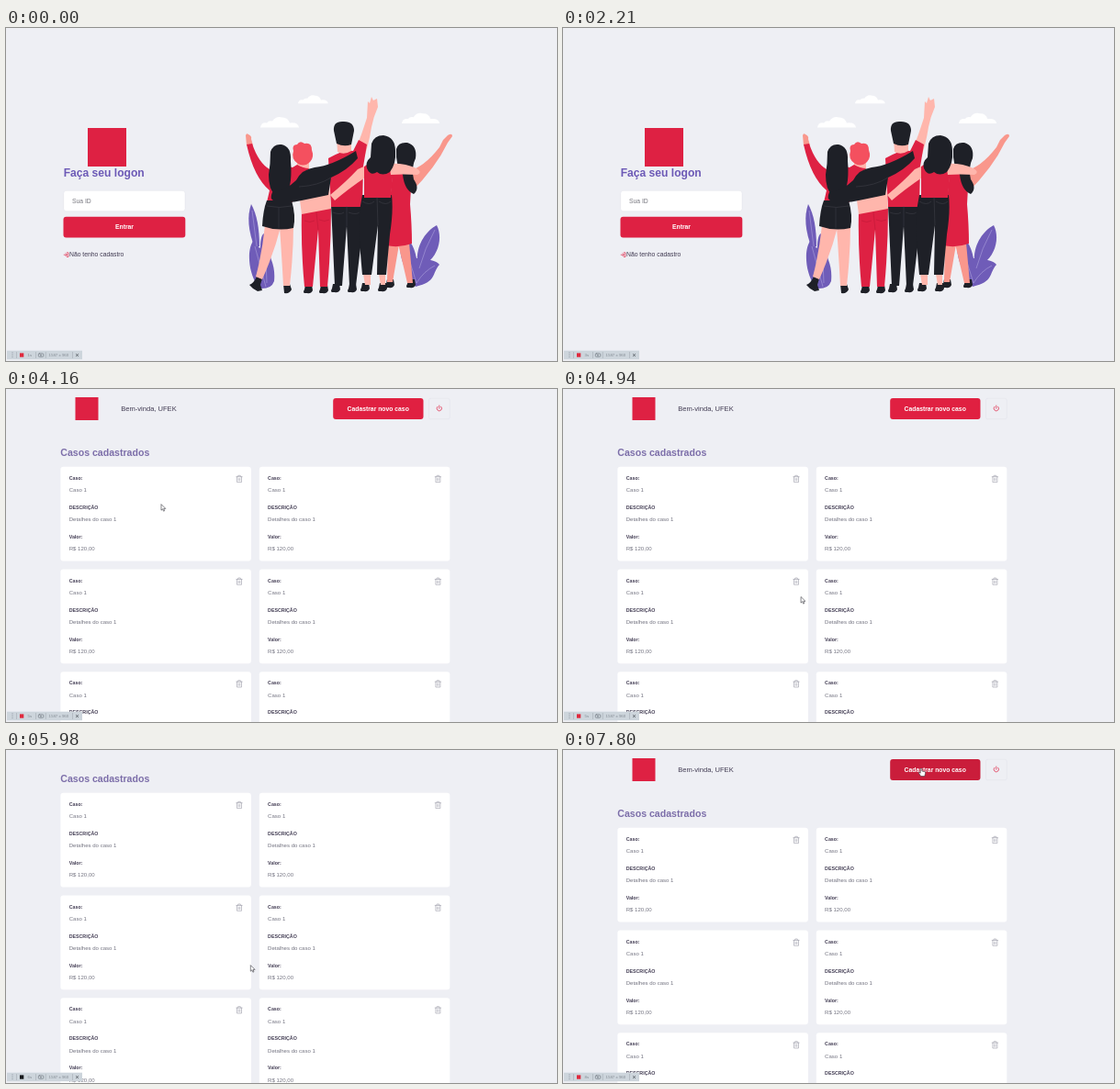
An HTML page that plays this animation: 600 by 363 pixels, repeating every 8000 ms.

```html
<!DOCTYPE html>
<html lang="pt">
<head>
<meta charset="utf-8">
<title>Casos</title>
<style>
html, body { margin: 0; width: 100%; height: 100%; overflow: hidden; background: #eeeff4; }
svg { display: block; width: 100%; height: 100%; }
text { font-family: "Liberation Sans", Arial, sans-serif; font-size: 6.8px; fill: #413b52; white-space: pre; }
.bold, .label { font-weight: bold; }
.label { font-size: 5.29px; }
.value { font-size: 6.05px; fill: #737380; }
.light { fill: #fff; }
.mid { text-anchor: middle; }
.red { fill: #de2143; }
.ink { fill: #1e2027; }
.skin { fill: #ffb6ac; }
.tan { fill: #f9978c; }
.leaf { fill: #6f5cb8; }
.white { fill: #fff; }
.box { stroke: #dcdce6; stroke-width: .4; }
.line { fill: none; stroke-width: .7; stroke-linecap: round; stroke-linejoin: round; }
.fold { fill: none; stroke: #55565e; stroke-width: .35; }
.vein { fill: none; stroke: #b9aee3; stroke-width: .5; }
.cursor { fill: #fff; stroke: #33333b; stroke-width: .6; stroke-linejoin: round; }
.tool { font-size: 4.4px; fill: #838a93; }
</style>
</head>
<body>
<svg viewBox="0 0 600 363" preserveAspectRatio="none">
  <defs>
    <path id="cloud" class="white" d="M0 0q1-6 7-5q2-3 6-2q4-6 11-4q6 0 8 6q9-1 10 5z"/>
    <g id="trash" class="line" stroke="#a8a8b3">
      <path d="M-3.2-2.3H3.2M-1.3-2.3V-3.7H1.3V-2.3M-2.5-2.3V3.6H2.5V-2.3M-.8-.5V1.9M.8-.5V1.9"/>
    </g>
    <path id="shoe" class="ink" d="M0 0h7l1 6q-2 4-6 3h-3q-2-1 0-4z"/>
  </defs>
  <rect width="600" height="363" fill="#eeeff4"/>

  <g id="login">
    <rect class="red" x="89" y="109" width="42" height="42"/>
    <text class="bold" x="62.7" y="162" style="font-size:12.1px;fill:#6c59b6">Faça seu logon</text>
    <rect class="white box" x="62.7" y="177.3" width="132.4" height="22.5" rx="3"/>
    <text x="72" y="190.7" style="fill:#77777f">Sua ID</text>
    <path id="caret" d="M72 184.3v8" stroke="#222" stroke-width=".6"/>
    <rect class="red" x="62.5" y="205.7" width="132.8" height="22.7" rx="3"/>
    <text class="bold light mid" x="129" y="219.3">Entrar</text>
    <path class="line" stroke="#e02041" d="M63.2 247.2h3.2m-1.4-1.5l1.5 1.5l-1.5 1.5M66.3 244.9h1.6v4.6h-1.6"/>
    <text x="69" y="249.4">Não tenho cadastro</text>

    <use href="#cloud" x="277" y="108.5"/>
    <use href="#cloud" transform="translate(318 82.3) scale(.78)"/>
    <use href="#cloud" transform="translate(431 104) scale(.98)"/>

    <g class="leaf">
      <path d="M271 240Q260 212 267 192Q276 208 276 238z"/>
      <path d="M276 284C263 268 262 240 270 231C276 240 277 243 277 236C278 221 284 219 286 236C285 250 294 256 292 276Q289 285 276 284z"/>
      <path d="M449 262C444 240 456 222 469 215C476 228 471 250 455 258z"/>
      <path d="M446 282C430 262 426 236 431 228C440 228 445 240 447 251C455 252 468 252 472 258C463 268 470 276 446 282z"/>
    </g>
    <path class="vein" d="M268 199L273 238M271 238L283 282M282 226L284 278M467 220Q456 240 450 262M433 233L447 278Q455 265 467 259"/>

    <!-- woman in the dress -->
    <use href="#shoe" x="415" y="274"/>
    <use href="#shoe" x="438" y="274"/>
    <path class="tan" d="M416 232L415 277h6L428 236zM427 235L437 278h6L439 234z"/>
    <path class="tan" d="M438 156Q455 152 472 130L476 122L481 117Q486 114 486 118L481 125Q468 152 441 179z"/>
    <path class="red" d="M421 158Q430 150 442 157L440 192Q442 215 442 235Q428 240 414 237Q413 210 418 190z"/>
    <path class="ink" d="M425 132Q427 124 437 125Q448 128 446 142Q441 152 444 165Q451 175 444 181Q434 177 432 160Q424 150 425 132z"/>

    <!-- tall man -->
    <use href="#shoe" x="356" y="279"/>
    <use href="#shoe" x="374" y="279"/>
    <path class="ink" d="M354 193H387L389 215L381 281H374L371 216L366 281H358z"/>
    <path class="skin" d="M378 140L387 116L393 98L394 80L396 82L398 75L400 79L404 77L405 86Q400 97 398 108Q395 128 388 147z"/>
    <path class="red" d="M351 142Q368 132 378 134L384 122L393 127L389 151L388 195H354z"/>
    <path class="skin" d="M360 120h16v14q-8 5-15 1z"/>
    <path class="ink" d="M357 112Q356 102 366 102Q379 101 379 112L376 127Q368 130 360 126z"/>
    <path class="fold" d="M356 201q8 3 12 0m5 0q8 3 12 0M371 194v22"/>

    <!-- woman in the red top -->
    <use href="#shoe" x="388" y="278"/>
    <use href="#shoe" x="407" y="278"/>
    <path class="skin" d="M388 262h9v18h-6zM405 262h8v18h-5zM394 149L391 163Q372 176 358 188L353 182Q370 168 383 154z"/>
    <path class="ink" d="M388 182H420Q422 200 418 225L414 269H404L405 215L398 269H388Q384 225 384 205z"/>
    <path class="red" d="M390 151Q405 143 422 152L419 185H390z"/>
    <path class="skin" d="M417 148Q434 147 447 153Q454 157 448 160Q432 159 419 160z"/>
    <path class="ink" d="M398 126Q401 117 411 117Q424 119 424 134Q425 148 418 157Q410 162 404 157Q397 162 393 153Q391 146 397 141z"/>
    <path class="fold" d="M388 189q8 5 13 0m5 0q8 5 13 0M404 184L405 215"/>

    <!-- friend with coral hair -->
    <use href="#shoe" x="326" y="280"/>
    <use href="#shoe" x="343" y="280"/>
    <path class="red" d="M322 200L354 196Q354 240 350 282H342L340 220L334 282H325Q321 240 322 200z"/>
    <path class="skin" d="M319 180L352 172L354 197L322 203z"/>
    <path class="skin" d="M317 140h13v14h-13z"/>
    <path class="fold" style="stroke:#a9142f" d="M338 201L340 220M325 210q6 3 11 0m5-1q6 3 11 0"/>
    <path d="M313 134Q311 127 317 127Q320 122 325 126Q333 124 333 133Q336 141 331 146Q325 152 318 148Q310 143 313 134z" fill="#f4505f"/>

    <!-- woman with the raised arm -->
    <path class="ink" d="M273 271l6 2l-2 7l2 6l-5 1q-6-3-9-7q5-2 8-9zM302 279h7l2 6q-2 5-8 4z"/>
    <path class="skin" d="M282 215L299 217Q292 245 279 274L272 271Q279 245 282 215zM298 217L313 216Q313 245 309 281H302Q300 245 298 217z"/>
    <path class="tan" d="M262 128L261 117Q262 114 264 116Q268 118 267 121L269 128z"/>
    <path class="red" d="M262 127L268 126Q275 147 287 154Q300 148 312 152L317 149Q324 153 330 153L313 170L312 190H284L287 177Q270 163 262 127z"/>
    <path class="ink" d="M288 135Q291 126 300 127Q311 129 310 145Q312 170 306 178Q300 186 293 182Q286 176 286 160Q288 148 288 135z"/>
    <path class="ink" d="M290 179Q287 186 291 188Q306 192 322 188L351 182L354 163Q372 155 383 142L381 134Q355 150 336 152Q322 154 316 166Q306 176 290 179z"/>
    <path class="fold" d="M319 173Q340 172 354 163"/>
    <path class="ink" d="M284 188H311Q316 205 313 218Q296 222 279 216Q280 198 284 188z"/>
    <path class="fold" d="M284 194q14 3 27 0M297 196v22"/>
  </g>

  <g id="profile">
    <rect class="red" x="75.5" y="9" width="25" height="25"/>
    <text x="125.3" y="24.2" style="font-size:7.56px">Bem-vinda, UFEK</text>
    <rect id="add" x="356.2" y="10" width="98.3" height="23" rx="3"/>
    <text class="bold light mid" x="405.2" y="24">Cadastrar novo caso</text>
    <rect class="box" fill="none" x="460.5" y="10.2" width="22.7" height="22.6" rx="2"/>
    <path class="line" stroke="#e02041" d="M471.8 18v3.2M473.7 19.2a2.7 2.7 0 1 1-3.8 0"/>
    <text class="bold" x="59.3" y="73.4" style="font-size:10.58px;fill:#7c6ea9">Casos cadastrados</text>
    <g id="cards"></g>
  </g>

  <path id="arrow" class="cursor" d="M0 0V6.6L1.6 5.2L2.6 7.6L3.7 7.1L2.7 4.8H4.8z"/>
  <path id="hand" class="cursor" d="M-.8 .5Q0-.5 .8 .5V3L4 3.7Q4.8 4 4.6 5.2L3.8 8.6H-.3L-2.7 5Q-2.6 3.8-1.6 4.6L-.8 5.3z"/>

  <g id="recorder">
    <rect x="1" y="351.7" width="82" height="9.5" fill="#cdd5dc"/>
    <path d="M7 353.5v6" stroke="#858d96" stroke-width=".9" stroke-dasharray="1 1.3"/>
    <path d="M11.5 353v7M32.5 353v7M43.3 353v7M72.5 353v7" stroke="#a4acb4" stroke-width=".6"/>
    <rect id="dot" x="15" y="354.4" width="4.3" height="4.3"/>
    <text id="clock" class="tool" x="23.5" y="358.2"></text>
    <rect class="line" x="35.3" y="354.8" width="5.5" height="3.6" rx="1" stroke="#737b84"/>
    <circle cx="38" cy="356.6" r=".9" fill="#737b84"/>
    <text class="tool" x="46.5" y="358.2">1587 x 960</text>
    <path d="M76.2 355.3l2.6 2.6m0-2.6l-2.6 2.6" stroke="#3c4249" stroke-width=".8"/>
  </g>
</svg>
<script>
const LOOP = 8000, STEP = 130, LAST = 7800;
const PAGE_AT = 2860, SCROLL_AT = 5200, BACK_AT = 6890, SCROLL = 38;
const $ = id => document.getElementById(id);
const show = (id, on) => $(id).setAttribute('visibility', on ? 'visible' : 'hidden');
const move = (id, x, y) => $(id).setAttribute('transform', `translate(${x} ${y})`);
const within = (t, from, to) => t >= from && t < to;

// Cursor stops: time, x, y
const stops = [
  [3380, 108.7, 217.3], [4160, 169, 125.6], [4290, 169, 125.6], [5070, 266.3, 234.6],
  [6890, 266.3, 234.6], [7800, 390, 20]
];

const lines = [
  ['label', 14.2, 'Caso:'], ['value', 27.6, 'Caso 1'],
  ['label', 46.2, 'DESCRIÇÃO'], ['value', 59.5, 'Detalhes do caso 1'],
  ['label', 78.2, 'Valor:'], ['value', 91.5, 'R$ 120,00']
];

function card(x, y) {
  const rows = lines.map(([kind, dy, text]) => `<text class="${kind}" x="9.3" y="${dy}">${text}</text>`);
  return `<g transform="translate(${x} ${y})"><rect class="white" width="207.5" height="102.7" rx="3"/>
    ${rows.join('')}<use href="#trash" x="194.6" y="13.2"/></g>`;
}

$('cards').innerHTML = [0, 1, 2].map(row =>
  [59.4, 275.8].map(x => card(x, 84.8 + row * 111.7)).join('')).join('');

function ease(t, from, to) {
  const p = Math.min(1, Math.max(0, (t - from) / (to - from)));
  return p * p * (3 - 2 * p);
}

function cursorAt(t) {
  let [, x, y] = stops[0];
  for (let i = 1; i < stops.length; i++) {
    const [from, x0, y0] = stops[i - 1], [to, x1, y1] = stops[i];
    if (t < from) break;
    const p = ease(t, from, to);
    x = x0 + (x1 - x0) * p;
    y = y0 + (y1 - y0) * p;
  }
  return [x, y];
}

function draw(time) {
  const t = Math.min(LAST, Math.floor(time / STEP) * STEP);
  const inside = t >= PAGE_AT, hover = t >= LAST;
  const pointing = hover || t <= 3380;
  show('login', !inside);
  show('profile', inside);
  show('caret', within(t, 390, 910) || within(t, 1560, 2080));
  show('arrow', inside && !pointing);
  show('hand', inside && pointing);

  const [x, y] = cursorAt(t);
  move('arrow', x, y);
  move('hand', x, y);
  move('profile', 0, t < BACK_AT ? -SCROLL * ease(t, SCROLL_AT - STEP, SCROLL_AT + 2 * STEP) : 0);
  $('add').setAttribute('fill', hover ? '#ca1d3b' : '#e02041');
  $('dot').setAttribute('fill', within(t, SCROLL_AT, 6110) ? '#15171b' : '#e0283c');
  $('clock').textContent = Math.floor(t / 1000) + 1 + 's';
}

function tick() {
  draw(performance.now() % LOOP);
  requestAnimationFrame(tick);
}
tick();
</script>
</body>
</html>
```
